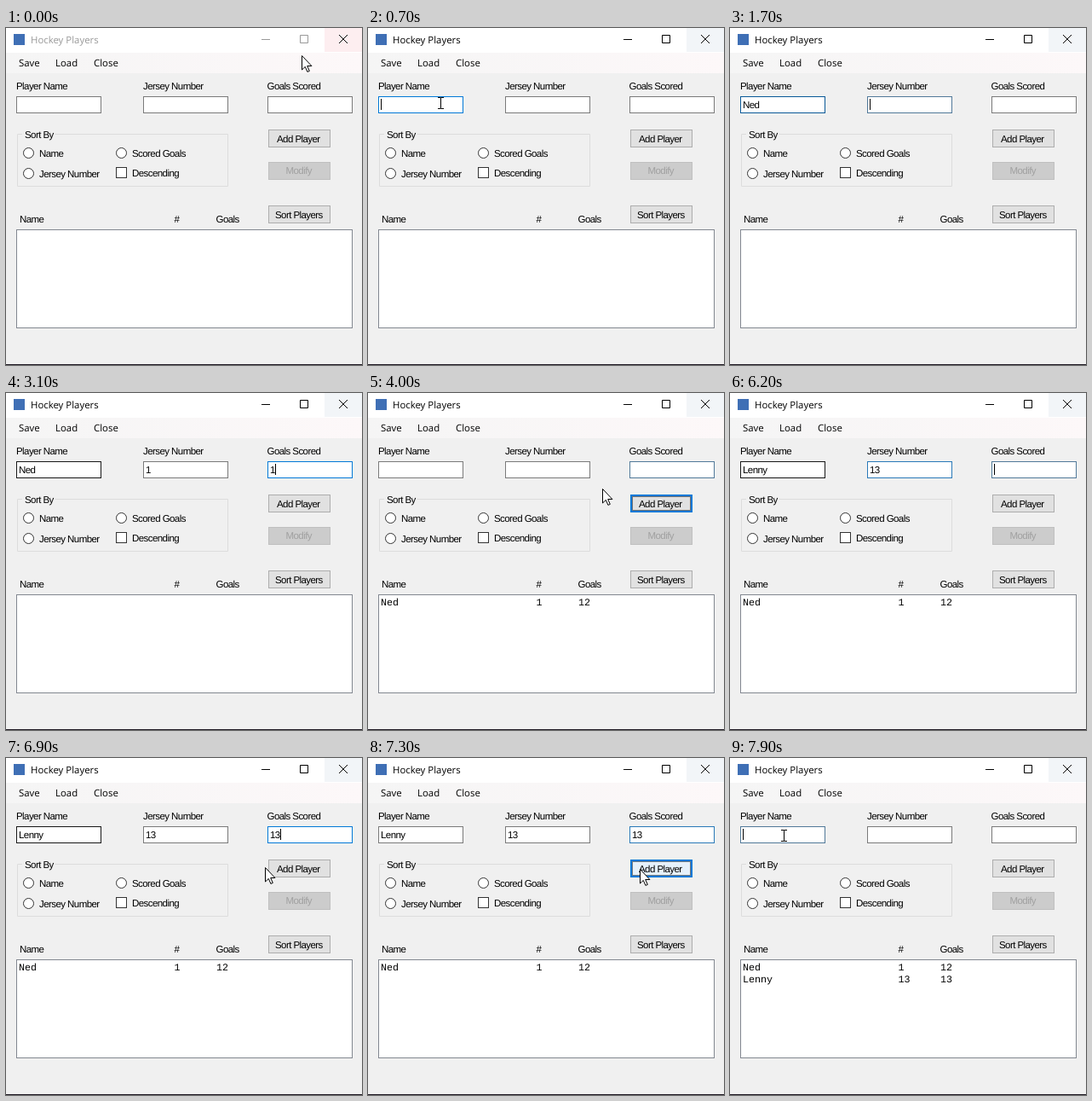
An HTML page for the animation above (8000 ms loop, 418 by 395 pixels).

```html
<!DOCTYPE html>
<html lang="en">
<head>
<meta charset="utf-8">
<title>Hockey Players</title>
<style>
  html, body { margin: 0; width: 100%; height: 100%; overflow: hidden; background: #f0f0f0; }
  svg { display: block; width: 100vw; height: 100vh; }
  text { font: 11.5px "Liberation Sans", Arial, sans-serif; letter-spacing: -.57px; text-rendering: geometricPrecision; white-space: pre; }
  .ui text { font: 11.4px "Open Sans", "Noto Sans", sans-serif; letter-spacing: 0; }
  .list text { font: 11.67px "Liberation Mono", monospace; letter-spacing: 0; }
  .line { fill: none; stroke: #000; }
  .button { fill: #e1e1e1; stroke: #adadad; }
  .choice { fill: #fff; stroke: #333; }
  .field { fill: #fff; stroke: #7a7a7a; }
</style>
</head>
<body>
<svg viewBox="0 0 418 395">
  <defs>
    <linearGradient id="strip"><stop stop-color="#f5f5f5"/><stop offset="1" stop-color="#fdf8f9"/></linearGradient>
  </defs>
  <rect width="418" height="395" fill="#f0f0f0"/>
  <g class="ui">
    <rect width="418" height="29" fill="#fff"/>
    <rect id="closeCell" x="374" width="44" height="28"/>
    <rect y="29" width="418" height="24" fill="url(#strip)"/>
    <rect x="9" y="7" width="13" height="13" fill="#3f6fb5"/>
    <text id="title" x="29" y="18">Hockey Players</text>
    <path id="sizers" class="line" d="M300 13.5h10M345.5 8.5h9v9h-9z"/>
    <path class="line" d="M391 8l10 10M401 8l-10 10"/>
    <text x="15" y="45">Save</text>
    <text x="58" y="45">Load</text>
    <text x="103" y="45">Close</text>
  </g>

  <text x="12" y="72">Player Name</text>
  <text x="161" y="72">Jersey Number</text>
  <text x="306.500" y="72">Goals Scored</text>
  <g id="fields"></g>

  <path class="line" d="M19 124.500h-5.500v61h247v-61h-203" style="stroke:#dcdcdc"/>
  <text x="22" y="129">Sort By</text>
  <g class="choice">
    <circle cx="26.500" cy="146.500" r="6"/>
    <circle cx="26.500" cy="170.500" r="6"/>
    <circle cx="135.500" cy="146.500" r="6"/>
    <rect x="129.500" y="163.500" width="12" height="12"/>
  </g>
  <text x="39" y="151">Name</text>
  <text x="39" y="175">Jersey Number</text>
  <text x="148" y="151">Scored Goals</text>
  <text x="148" y="174">Descending</text>

  <rect id="add" class="button" x="308.500" y="119.500" width="72" height="20"/>
  <g id="addFocus" class="line">
    <rect x="309" y="120" width="71" height="19" stroke="#0078d7" stroke-width="2"/>
    <rect x="310.500" y="121.500" width="68" height="16" stroke-dasharray="1"/>
  </g>
  <text x="318" y="134">Add Player</text>
  <rect x="308.500" y="157.500" width="72" height="20" fill="#ccc" stroke="#bfbfbf"/>
  <text x="328.500" y="171" fill="#a0a0a0">Modify</text>
  <rect class="button" x="308.500" y="208.500" width="72" height="20"/>
  <text x="316" y="223">Sort Players</text>

  <text x="16" y="228">Name</text>
  <text x="197.500" y="228">#</text>
  <text x="246.500" y="228">Goals</text>
  <rect x="12.500" y="236.500" width="394" height="115" fill="#fff" stroke="#828790"/>
  <g id="rows" class="list"></g>
  <rect y="394" width="418" height="1" fill="#201a24"/>

  <path id="caret" class="line" d="M.5 83v13"/>
  <path id="beam" class="line" d="M-3.500-6.500h3l.5 .5 .5-.5h3M0-6.500v13M-3.500 6.500h3l.5-.5 .5 .5h3"/>
  <path id="arrow" d="M.5 .5V17l3.800-3.600 2.600 6 2.400-1-2.600-5.900h5.200z" fill="#fff" stroke="#000"/>
</svg>
<script>
const LOOP = 8000, STEP = 100, ACTIVE = 500, ADD = 3;
const $ = id => document.getElementById(id);
const show = (el, on) => el.setAttribute('visibility', on ? 'visible' : 'hidden');

const fieldX = [12, 161, 307];
// [time, control that takes the focus]
const focuses = [[ACTIVE, 0], [1700, 1], [2500, 2], [3900, ADD], [4300, 0],
  [5600, 1], [6200, 2], [7300, ADD], [7900, 0]];
// [time, field, its text]
const keys = [[1200, 0, 'N'], [1400, 0, 'Ned'], [2300, 1, '1'], [3100, 2, '1'], [3300, 2, '12'],
  [4900, 0, 'L'], [5100, 0, 'Le'], [5200, 0, 'Len'], [5300, 0, 'Lenn'], [5400, 0, 'Lenny'],
  [5900, 1, '1'], [6000, 1, '13'], [6500, 2, '1'], [6600, 2, '13']];
const adds = [[3900, 'Ned', '1', '12'], [7400, 'Lenny', '13', '13']];
// Pointer places as [time, x, y]
const track = [[0, 347, 32], [200, 270, 52], [500, 90, 87], [700, 85, 88], [3200, 85, 88],
  [3300, 90, 86], [3400, 135, 77], [3700, 315, 127], [3900, 318, 128], [4000, 275, 112],
  [4200, 120, 92], [4300, 48, 88], [4500, 41, 88], [6600, 41, 88], [6700, 50, 88],
  [6900, 304, 128], [7100, 318, 130], [7400, 320, 130], [7600, 220, 112], [7800, 70, 91], [8000, 55, 90]];
// The pointer hides while typing
const hidden = [[1200, 3300], [4900, 6700]];

$('fields').innerHTML = fieldX.map(x =>
  `<rect class="field" x="${x + .5}" y="80.5" width="99" height="19"/><text x="${x + 3}" y="94"></text>`).join('');
$('rows').innerHTML = adds.map(([, name, number, goals], i) => {
  const y = 249 + 14 * i;
  return `<g><text x="15" y="${y}">${name}</text><text x="197.5" y="${y}">${number}</text><text x="247" y="${y}">${goals}</text></g>`;
}).join('');
const boxes = $('fields').querySelectorAll('rect');
const inputs = $('fields').querySelectorAll('text');

function pointerAt(t) {
  const i = track.findIndex(p => p[0] > t);
  const [t0, x0, y0] = track[i - 1], [t1, x1, y1] = track[i];
  const k = (t - t0) / (t1 - t0);
  return [Math.round(x0 + (x1 - x0) * k), Math.round(y0 + (y1 - y0) * k)];
}

const fieldUnder = ([x, y]) => y >= 80 && y < 100 ? fieldX.findIndex(f => x >= f && x < f + 100) : -1;

function borderColor(focus, hover) {
  const rest = hover ? 23 : 122;
  return `rgb(${[0, 120, 215].map(c => Math.round(rest + (c - rest) * focus))})`;
}

function draw(t) {
  const active = t >= ACTIVE;
  $('title').setAttribute('fill', active ? '#000' : '#999');
  $('sizers').style.stroke = active ? '#000' : '#999';
  $('closeCell').setAttribute('fill', active ? '#f2f5f8' : '#fdeef0');

  const past = focuses.filter(f => f[0] <= t);
  const [since, now] = past[past.length - 1] || [0, -1];
  const before = past.length > 1 ? past[past.length - 2][1] : -1;
  const fade = Math.min(1, (t - since + STEP) / 300);

  const added = adds.filter(a => a[0] <= t);
  const cleared = added.length ? added[added.length - 1][0] : 0;
  const hovered = fieldUnder(pointerAt(Math.max(0, t - 200)));
  inputs.forEach((input, i) => {
    const typed = keys.filter(k => k[1] === i && k[0] <= t && k[0] > cleared).pop();
    input.textContent = typed ? typed[2] : '';
    boxes[i].style.stroke = borderColor(i === now ? fade : i === before ? 1 - fade : 0, i === hovered);
  });
  [...$('rows').children].forEach((row, i) => show(row, i < added.length));

  const hasCaret = now >= 0 && now < ADD;
  show($('caret'), hasCaret);
  if (hasCaret) {
    const x = fieldX[now] + 3 + Math.round(inputs[now].getComputedTextLength());
    $('caret').setAttribute('transform', `translate(${x} 0)`);
  }

  const pos = pointerAt(t), [x, y] = pos;
  const visible = !hidden.some(([from, to]) => t >= from && t < to);
  const overField = fieldUnder(pos) >= 0;
  const overAdd = x >= 308 && x < 381 && y >= 119 && y < 140;
  show($('beam'), visible && overField);
  show($('arrow'), visible && !overField);
  $('beam').setAttribute('transform', `translate(${x + .5} ${y})`);
  $('arrow').setAttribute('transform', `translate(${x} ${y})`);

  $('add').style.fill = overAdd ? '#e5f1fb' : '#e1e1e1';
  $('add').style.stroke = overAdd ? '#0078d7' : '#adadad';
  show($('addFocus'), now === ADD);
}

const start = performance.now();
function tick() {
  const t = (performance.now() - start) % LOOP;
  draw(Math.floor(t / STEP) * STEP);
  requestAnimationFrame(tick);
}
tick();
</script>
</body>
</html>
```
